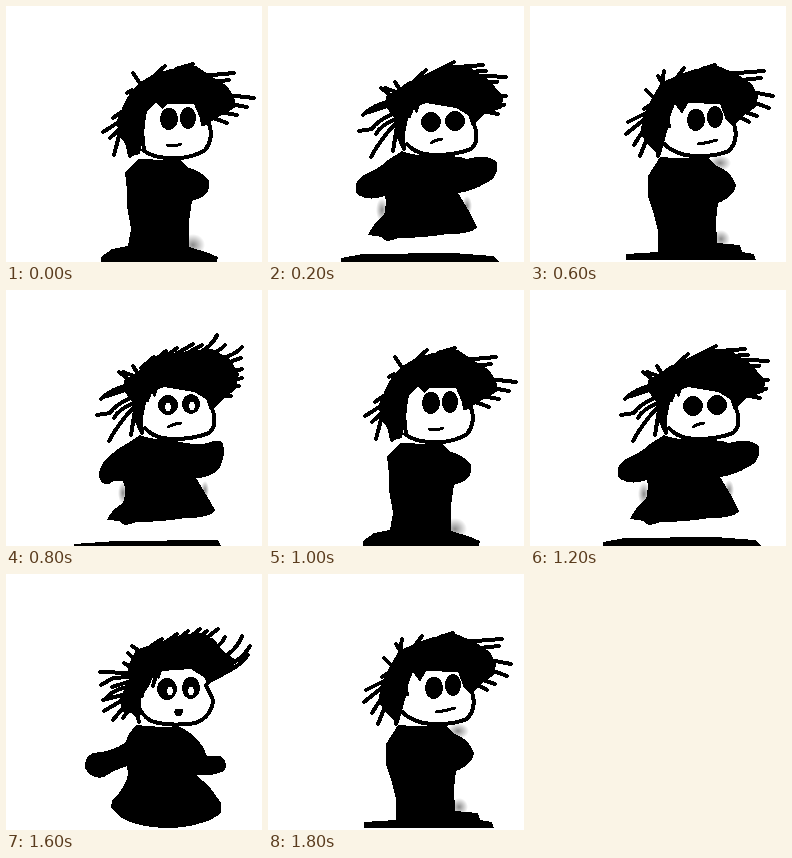
Animation, 256 px wide and 256 px high, one loop 2 s. Source, as an HTML page:

```html
<!DOCTYPE html>
<html lang="en">
<head>
<meta charset="utf-8">
<title>Windblown figure</title>
<style>
html, body { margin: 0; width: 100%; height: 100%; overflow: hidden; background: #fff; }
svg { display: block; width: 100vw; height: 100vh; }
</style>
</head>
<body>
<svg viewBox="0 0 256 256" shape-rendering="crispEdges" stroke-linecap="round" stroke-linejoin="round">
  <defs>
    <radialGradient id="smudge">
      <stop offset="0" stop-color="#000" stop-opacity=".45"/>
      <stop offset="1" stop-color="#000" stop-opacity="0"/>
    </radialGradient>
  </defs>
  <rect width="256" height="256" fill="#fff"/>
  <g id="stage"></g>
</svg>
<script>
const STEP = 200;
const ORDER = ['stand', 'hop', 'swirl', 'lean', 'reach', 'stand', 'hop', 'burst', 'swirl', 'lean'];

// Parts shared by both airborne poses
const leftLocks = 'M124 95Q106 98 95 109M122 99L101 106M124 108Q108 116 104 123L91 125M126 114Q113 119 108 128M127 118Q112 134 103 151M129 120L125 145M134 120L136 143M126 92L113 82M128 86L117 82M132 84L127 76';
const airFace = 'M146 103L149 108L152 99L158 97L188 102L200 109L204 120Q208 131 203 140Q190 147 168 147Q146 145 140 132L143 122L140 118Z';
const airCheek = 'M205 116Q213 134 203 143Q188 149 168 149Q148 149 139 138';

// eyes: [x, y, rx, ry, pupil dx, pupil dy]; soft: [x, y, rx, ry]
const POSES = {
  stand: {
    hair: 'M126 150L118 136L112 128L111 114L118 98L125 85L133 77L148 68L165 63L190 60L205 70L220 79L228 90L230 101L216 109L204 116L200 122L138 126L134 148Z',
    locks: 'M150 68L159 60M170 63L187 58M195 70L228 67M200 77L223 74M212 88L248 92M212 96L241 101M208 105L231 109M202 110L221 117M116 114L97 126M115 122L104 132M114 126L108 149M120 132L124 150M126 84L121 87M133 76L127 67M117 105L107 112M136 125L138 145',
    face: 'M141 106L150 96L156 103L161 98L188 98L194 112L195 120L203 119Q207 134 197 144Q184 151 166 151Q147 150 139 141Q137 122 141 106Z',
    cheek: 'M203 117Q208 133 199 144Q185 153 166 152Q146 152 137 144',
    eyes: [[163, 113, 9, 11], [182, 112, 8, 11]],
    mouth: 'M161 139Q168 141 175 138',
    body: 'M132 153Q158 154 174 154L183 162Q196 165 203 175Q205 187 194 192L186 195L183 215L183 241L200 246L212 251L211 256H95V251L106 243L122 240L125 223L121 200L121 184L119 167Z',
    soft: [[187, 239, 12, 11]]
  },
  hop: {
    hair: 'M134 143L128 130L126 112L118 101L118 90L130 83L140 76L165 66L180 60L203 62L220 73L235 90L234 102L217 108L206 118L198 120L140 112Z',
    locks: leftLocks + 'M143 78L158 64M155 72L186 56M178 62L215 59M180 67L218 65M200 69L238 71M210 76L229 76M213 88L238 90M207 99L236 99M210 104L230 108',
    face: airFace,
    cheek: airCheek,
    eyes: [[163, 116, 10, 10], [187, 115, 10, 10]],
    mouth: 'M163 137Q167 134 174 133',
    body: 'M134 145Q146 150 166 150Q188 149 199 153Q222 147 229 157Q231 171 218 177Q205 185 190 187Q201 204 209 221Q205 228 180 228Q155 232 130 232Q118 238 114 231L100 229Q104 219 116 209Q119 197 117 190Q100 196 89 188Q84 177 96 169Q112 162 120 154Z',
    soft: [[114, 204, 6, 12], [199, 200, 5, 10]],
    ground: 'M73 252L95 248L185 247L225 250L232 256H73Z'
  },
  swirl: {
    hair: 'M134 148L126 139L116 138L114 123L123 108L122 92L130 76L150 69L175 61L194 59L208 65L217 77L230 86L226 97L214 104L204 109L198 118L136 120Z',
    locks: 'M124 99L94 98M124 103L107 104L95 111M122 108L106 113M121 113Q106 116 99 125M120 120L97 126M120 124L98 137M120 130L107 146M124 134L117 144M126 94L118 89M127 84L122 79M132 76L126 72M145 72L156 65M160 68L171 60M172 66L182 57M180 66L194 55M188 67L201 57M194 69L212 55M198 80Q215 73 219 63M200 91Q229 82 236 62M205 98Q233 91 244 72M202 102Q226 101 242 81M128 126L133 148M138 100L136 122M144 98L143 108M151 97L147 112',
    face: 'M143 112L148 101L153 106L156 97L185 95L199 104Q201 116 207 126Q206 141 190 148Q166 152 146 146Q133 138 135 124Z',
    cheek: 'M200 111L207 126Q206 142 190 149Q164 153 145 147Q135 141 132 130',
    eyes: [[161, 115, 10, 11, 3, 2], [185, 114, 9, 11, 0, 3]],
    mouth: 'M170 136H176M169 138H176M170 140H175',
    body: 'M131 151Q155 154 172 152Q188 159 197 173L201 182L215 182Q223 189 218 197Q205 203 190 201L203 212L215 229L215 239Q205 247 195 249Q180 254 160 254Q130 253 114 243L105 234L106 227Q120 213 122 200L121 192Q108 196 98 203Q85 206 79 194Q78 183 87 179Q106 178 120 168Q122 158 131 151Z'
  },
  lean: {
    hair: 'M130 151L120 141L110 127L114 108L122 92L131 77L148 69L165 63L188 60L207 68L222 78L228 90L226 101L212 111L204 120L138 122Z',
    locks: 'M118 106L98 116M116 112L96 128M116 120L104 139M118 130L110 150M124 92L116 84M122 98L114 103M132 78L134 65M134 80L128 70M148 70L154 62M172 63L185 59M195 68L234 65M202 75L231 72M212 84L243 90M212 92L239 102M205 103L227 110M204 108L219 116M131 130L128 150',
    face: 'M140 111L145 98L152 108L158 97L190 98L196 114L204 121Q207 134 198 144Q184 150 164 149Q146 147 135 134L141 125Z',
    cheek: 'M204 118Q209 134 199 145Q184 151 164 150Q144 149 132 136',
    eyes: [[166, 114, 9, 11], [185, 111, 8, 11]],
    mouth: 'M168 138Q178 137 187 134',
    body: 'M130 151Q158 153 178 152L187 160Q201 165 206 179Q204 191 188 197L186 215L187 237L210 239L212 246L224 248L226 254H96V248L128 246L128 225L123 205L118 190L118 170Z',
    soft: [[190, 157, 11, 8], [191, 233, 9, 9]]
  },
  reach: {
    hair: 'M134 143L128 130L126 112L118 101L118 90L130 83L138 75L160 66L185 60L206 59L224 69L233 84L229 100L216 110L206 120L198 120L140 112Z',
    locks: leftLocks + 'M135 78L148 67M142 76L160 61M152 72L171 58M160 70L187 54M176 66L196 55M188 66Q207 56 211 45M198 67Q212 63 219 55M206 70Q228 67 236 57M212 76L235 68M215 85L236 79M215 93L236 88M213 99L233 96M210 105L225 106',
    face: airFace,
    cheek: airCheek,
    eyes: [[162, 115, 10, 10, 0, 2], [185, 114, 9, 10, 1, 2]],
    mouth: 'M162 137Q167 134 175 133',
    body: 'M134 145Q146 150 166 150Q188 156 202 153Q212 148 217 153Q220 166 213 179Q204 188 190 188Q200 204 209 220Q205 228 180 228Q155 232 130 232Q118 238 114 231L101 230Q105 220 117 213Q121 201 117 191Q106 190 104 194Q95 195 93 187Q92 178 100 169Q112 158 122 153Z',
    soft: [[117, 203, 5, 11], [199, 200, 4, 9]],
    ground: 'M68 254L110 251L212 250L215 256H68Z'
  },
  burst: {
    hair: 'M134 150L126 141L116 138L114 122L121 108L119 97L124 86L134 77L150 70L170 64L190 61L207 68L223 76L233 86L227 98L210 108L201 117L136 122Z',
    locks: 'M133 82Q117 78 109 68M129 84L114 78M138 77Q127 69 125 57M124 93L96 98M121 97L99 105M122 104L104 110M120 112L97 117M119 120L100 129M119 126L104 140M120 130L110 149M126 135L120 146M144 75L150 64M150 72L157 57M160 70L165 55M168 68L177 54M177 67L184 55M183 67L190 46M189 67L197 53M195 69L206 57M199 73L217 59M205 76L224 61M208 79L233 67M212 82L246 70M214 86L254 80M216 89L251 89M216 94L243 96M210 99L234 104M207 103L227 110M203 107L220 117M131 130L131 151M139 100L136 122M146 98L144 112M152 97L148 109',
    face: 'M143 114L149 102L154 106L158 97L187 97L196 108L198 118L204 121Q207 134 196 146Q183 153 160 149Q143 145 137 136L138 124Z',
    cheek: 'M201 115Q209 132 197 147Q184 155 160 151Q144 148 135 140',
    eyes: [[161, 115, 11, 11, 1, 3], [183, 110, 9, 11, 2, 3]],
    mouth: 'M170 141L173 141',
    body: 'M131 150Q155 154 180 153Q195 158 200 167L204 183L216 182Q223 188 218 196Q205 202 190 202L202 210L214 224L216 241L204 242L199 247L212 252V256H93V252L112 245L117 240L107 237Q109 222 122 208L122 183Q109 188 98 200Q85 204 76 193Q74 184 84 178Q98 165 119 156Z',
    feet: [[135, 243, 6, 4], [188, 244, 6, 4]]
  }
};

const tag = (name, attrs) =>
  `<${name} ${Object.entries(attrs).map(([k, v]) => `${k}="${v}"`).join(' ')}/>`;
const shape = (d, fill = '#000') => d ? tag('path', { d, fill }) : '';
const line = (d, width) => tag('path', { d, fill: 'none', stroke: '#000', 'stroke-width': width });
const oval = ([cx, cy, rx, ry], fill) => tag('ellipse', { cx, cy, rx, ry, fill });

function eye([x, y, rx, ry, dx, dy]) {
  const ball = oval([x, y, rx, ry], '#000');
  const rim = oval([x, y, rx + 1, ry + 1], '#fff');
  return rim + ball + (dx === undefined ? '' : oval([x + dx, y + dy, 3, 4], '#fff'));
}

function drawPose(p) {
  return [
    ...(p.soft || []).map(s => oval(s, 'url(#smudge)')),
    shape(p.ground),
    shape(p.hair),
    shape(p.face, '#fff'),
    line(p.locks, 4),
    line(p.cheek, 4),
    ...p.eyes.map(eye),
    line(p.mouth, 3),
    shape(p.body),
    ...(p.feet || []).map(f => oval(f, '#fff'))
  ].join('');
}

const stage = document.getElementById('stage');
stage.innerHTML = Object.entries(POSES)
  .map(([name, p]) => `<g id="${name}">${drawPose(p)}</g>`).join('');

function show(t) {
  const name = ORDER[Math.floor(t / STEP) % ORDER.length];
  for (const g of stage.children) g.style.display = g.id === name ? '' : 'none';
}

const start = performance.now();
function tick() {
  show(performance.now() - start);
  requestAnimationFrame(tick);
}
tick();
</script>
</body>
</html>
```
